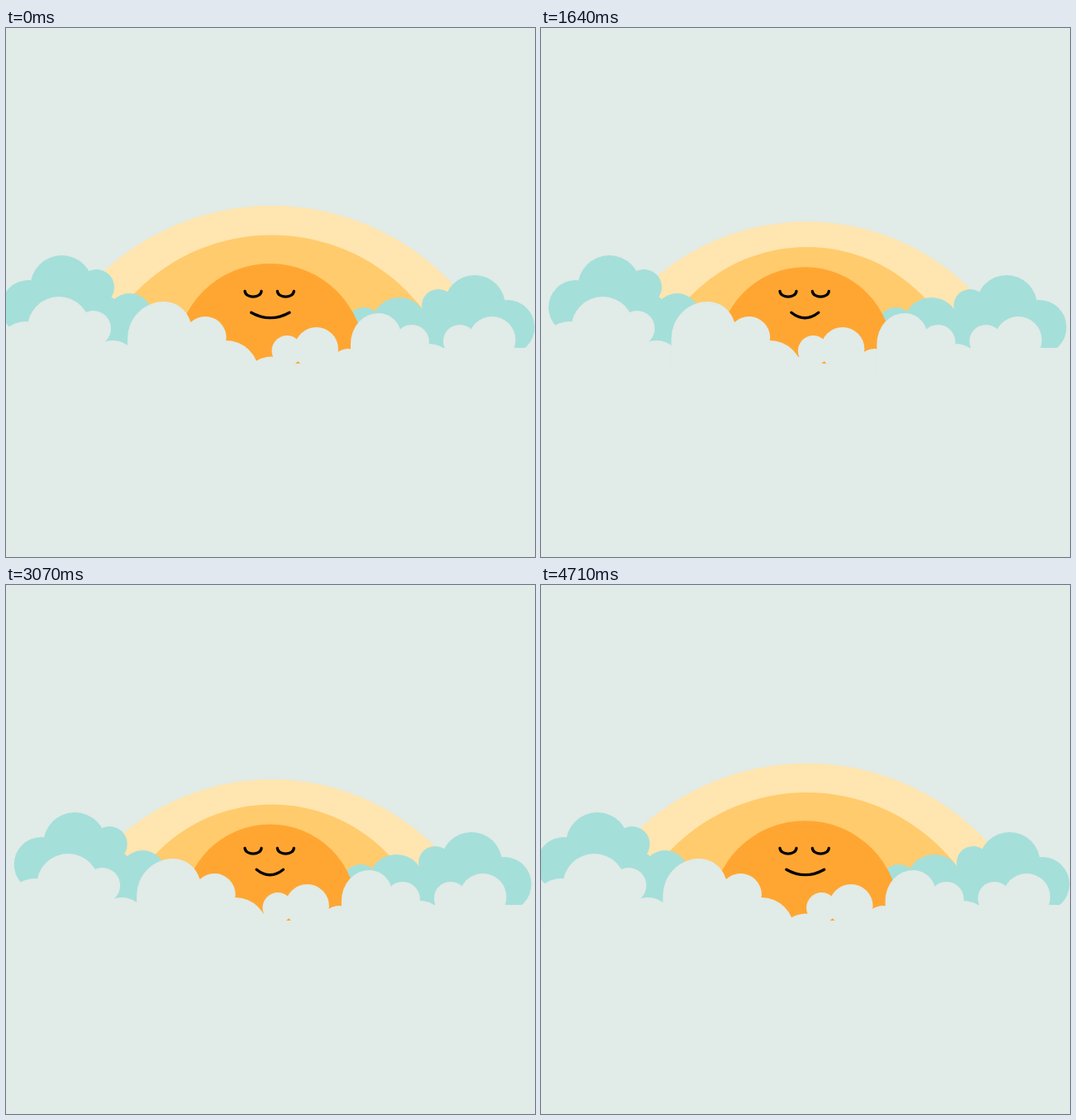
An HTML page that plays this animation: 640x640 px, repeating every 4780 ms.

```html
<!DOCTYPE html>
<html lang="en">
<head>
<meta charset="utf-8">
<title>Resting sun</title>
<style>
  html, body { margin: 0; height: 100%; overflow: hidden; background: #e1ebe7; }
  svg { display: block; width: 100%; height: 100%; }
  .sky { fill: #e1ebe7; }
  .teal { fill: #a5dfda; }
  .face { fill: none; stroke: #000; stroke-width: 3.3; stroke-linecap: round; }
</style>
</head>
<body>
<svg viewBox="0 0 640 640">
  <circle id="halo" cx="321.5" fill="#ffe5af"/>
  <circle id="glow" cx="321.5" fill="#ffcb6d"/>

  <g class="teal" id="backLeft">
    <circle cx="27" cy="338" r="33"/>
    <circle cx="67.5" cy="313" r="38"/>
    <circle cx="109.5" cy="313.5" r="21.5"/>
    <circle cx="149.5" cy="349" r="28"/>
    <path d="M27 338L67 313H110L130 327L149 349L156 390H27Z"/>
  </g>
  <g class="teal" id="backRight">
    <circle cx="433" cy="360" r="22"/>
    <circle cx="476" cy="360" r="34"/>
    <circle cx="523" cy="336" r="20"/>
    <circle cx="567" cy="336" r="37"/>
    <circle cx="606.5" cy="362" r="33"/>
    <path d="M433 360H476L523 336H567L606 362L628 387H433Z"/>
  </g>

  <circle id="sun" cx="319.5" fill="#ffa632"/>
  <path class="face" d="M289 318.5C290 327.3 308 327.3 309 318.5M328.3 318.5C329.3 327.3 347.3 327.3 348.3 318.5"/>
  <path class="face" id="smile"/>

  <path class="sky" d="M0 387H250V406H440V387H640V640H0Z"/>
  <g class="sky" id="frontLeft">
    <circle cx="23.5" cy="388" r="33"/>
    <circle cx="64" cy="363" r="38"/>
    <circle cx="105.5" cy="363.5" r="21.5"/>
    <circle cx="129" cy="408" r="30"/>
    <path d="M23 390L64 363H106L129 390Z"/>
    <path d="M147 420V376A44 45 0 0 1 191 331A33.5 33.5 0 0 1 223 355L241 374L266 400V420Z"/>
    <circle cx="241" cy="374.5" r="25.5"/>
    <circle cx="266" cy="418" r="40"/>
  </g>
  <g class="sky" id="frontRight">
    <circle cx="321" cy="431.5" r="34"/>
    <circle cx="340" cy="390.5" r="18.5"/>
    <circle cx="375.5" cy="388.5" r="26.5"/>
    <circle cx="414" cy="410" r="22"/>
    <path d="M417 420V382A33.5 37 0 0 1 450.5 345A27.5 27.5 0 0 1 477 365L491 380L512 400V420Z"/>
    <circle cx="491" cy="380" r="21"/>
    <circle cx="511.5" cy="415.5" r="33.5"/>
    <circle cx="549" cy="379" r="20"/>
    <circle cx="588" cy="377.5" r="28.5"/>
  </g>
</svg>
<script>
const LOOP = 4780;
const el = id => document.getElementById(id);

// Place a circle by its top edge and radius.
function hang(id, top, r) {
  el(id).setAttribute("r", r);
  el(id).setAttribute("cy", top + r);
}

function slide(id, dx) {
  el(id).setAttribute("transform", `translate(${dx} 0)`);
}

function draw(now) {
  // Linear breath: 0 = open, 1 = drawn in.
  const p = 1 - Math.abs(2 * (now % LOOP) / LOOP - 1);

  hang("halo", 215 + 28.2 * p, 300 - 27 * p);
  hang("glow", 250.5 + 21 * p, 231 - 51 * p);
  hang("sun", 285 + 6.3 * p, 114.5 - 13 * p);

  slide("backLeft", 22 * p);
  slide("backRight", -5.4 * p);
  slide("frontLeft", 15.5 * p);
  slide("frontRight", -15.5 * p);

  const mid = 319.8 - 0.7 * p, half = 23.2 - 9.8 * p;
  el("smile").setAttribute("d", `M${mid - half} 344.2Q${mid} 357.2 ${mid + half} 344.2`);
}

const start = performance.now();
function tick() {
  draw(performance.now() - start);
  requestAnimationFrame(tick);
}
tick();
</script>
</body>
</html>
```
